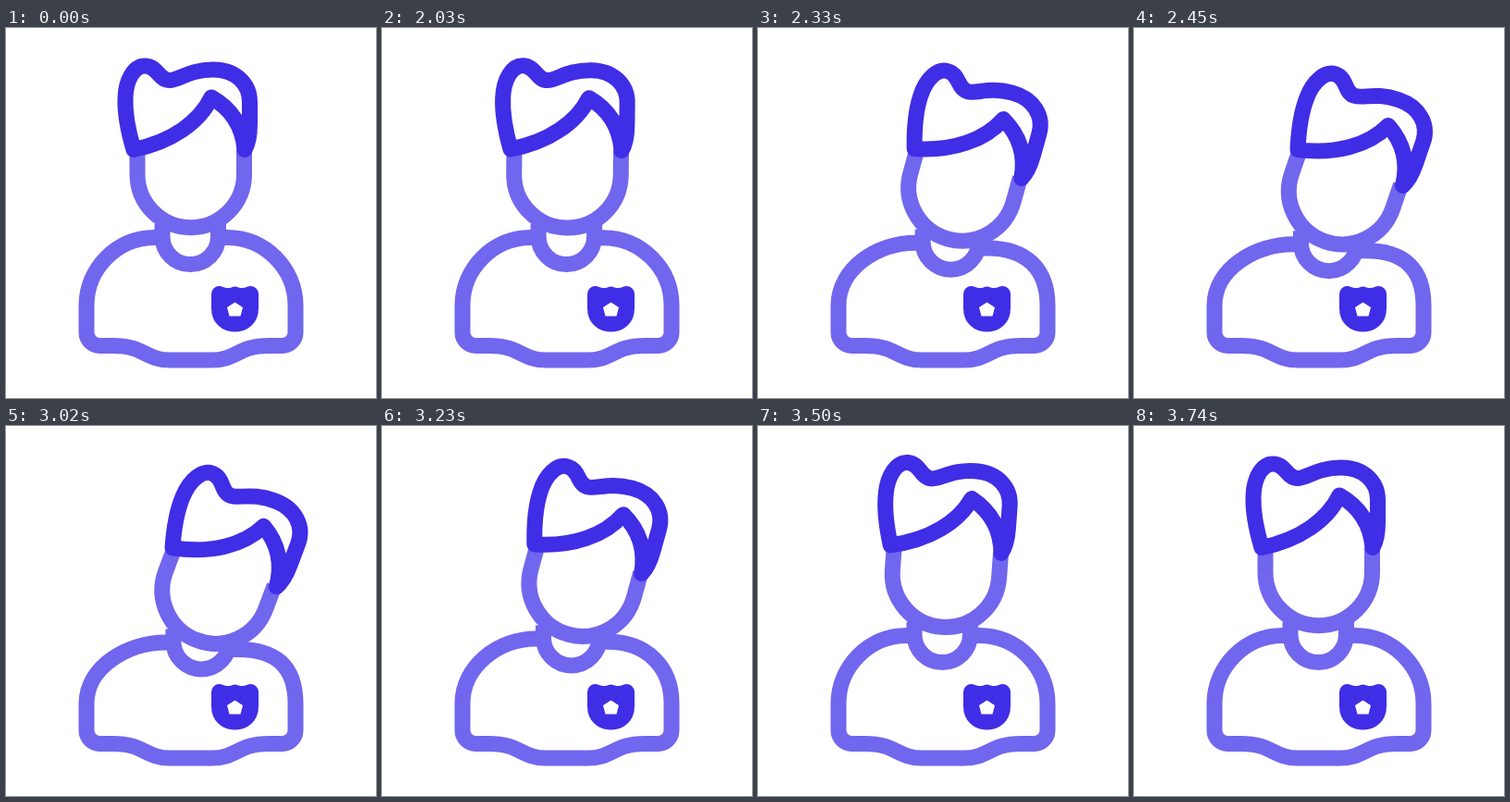
Write an HTML page with a canvas that moves like this. It is 400 px wide and 400 px high and loops after 3.77 s.

```html
<!DOCTYPE html>
<html lang="en">
<head>
<meta charset="utf-8">
<title>Tilting head</title>
<style>
  html, body { margin: 0; width: 100%; height: 100%; overflow: hidden; background: #fff; }
  canvas { display: block; width: 400px; height: 400px; }
</style>
</head>
<body>
<canvas id="stage"></canvas>
<script>
const LOOP = 3770;
const LIGHT = '#7166ee';
const DARK = '#402de6';
const TILT = 20.6 * Math.PI / 180;
const NECK = { x: 176.7, y: 204.8 };

const canvas = document.getElementById('stage');
const ctx = canvas.getContext('2d');
const dpr = window.devicePixelRatio || 1;
canvas.width = canvas.height = 400 * dpr;

const hair = new Path2D(
  'M138 131.5 C131 108 128.5 90 129 76 C129.5 55 139 41 150 41 ' +
  'C164 41 165 56.5 177 56.5 C187 56.5 198 45 224 45 C248 45 263.5 60 263.5 80 ' +
  'V104 Q263.5 122 258 131.5 C256 108 245 88 222 75 C209 102 179 123 138 131.5 Z');
const face = new Path2D('M142 131 V158 A57.75 57.75 0 0 0 257.5 158 V131');
const collar = new Path2D('M169 212 V225.25 A30.25 30.25 0 0 0 229.5 225.25 V212');
const badge = new Path2D(
  'M230.5 287.5 Q239 291.5 247.5 288 Q256 291.5 264.5 287.5 V303 ' +
  'C264.5 314 257 320 247.5 320 C238 320 230.5 314 230.5 303 Z');
const badgeHole = new Path2D('M247.5 296.5 L256 302 L253.5 311.5 H241.5 L239 302 Z');

function bezier(x1, y1, x2, y2) {
  const at = (a, b, u) => 3 * a * u * (1 - u) ** 2 + 3 * b * u * u * (1 - u) + u ** 3;
  return p => {
    if (p <= 0) return 0;
    if (p >= 1) return 1;
    let lo = 0, hi = 1;
    for (let i = 0; i < 24; i++) {
      const mid = (lo + hi) / 2;
      if (at(x1, x2, mid) < p) lo = mid; else hi = mid;
    }
    return at(y1, y2, lo);
  };
}

const tiltIn = bezier(0.3, 0.17, 0.4, 1);
const tiltOut = bezier(0.333, 0, 0.55, 1);
const slide = bezier(0.333, 0, 0.5, 1);
const span = (t, from, to) => (t - from) / (to - from);

function stroke(path, color) {
  ctx.strokeStyle = color;
  ctx.stroke(path);
}

function fill(path, color) {
  ctx.fillStyle = color;
  ctx.fill(path);
}

// The shoulders follow the collar; the right one sinks twice as far.
function bodyPath(move) {
  const dx = 12 * move;
  const left = 161 + dx, leftY = 226.5 + 7.5 * move;
  const right = 239 + dx, rightY = 226.5 + 15 * move;
  return new Path2D(
    `M${left + 8} ${leftY} H${left} C${left - 41} ${leftY} 87 260 87 300 ` +
    'V329 A14.5 14.5 0 0 0 101.5 343.5 H116 ' +
    'C150 343.5 150 359 178 359 H222 C250 359 250 343.5 284 343.5 H298.5 ' +
    `A14.5 14.5 0 0 0 313 329 V300 C313 260 ${right + 41} ${rightY} ${right} ${rightY} h-9`);
}

function draw(t) {
  const tilt = tiltIn(span(t, 2000, 2640)) - tiltOut(span(t, 3000, 3755));
  const move = slide(span(t, 2000, 2545)) - slide(span(t, 3000, 3500));

  ctx.setTransform(dpr, 0, 0, dpr, 0, 0);
  ctx.fillStyle = '#fff';
  ctx.fillRect(0, 0, 400, 400);
  ctx.lineWidth = 17;
  ctx.lineJoin = 'round';

  stroke(bodyPath(move), LIGHT);
  fill(badge, DARK);
  stroke(badge, DARK);
  fill(badgeHole, '#fff');

  ctx.save();
  ctx.translate(12 * move, 7.5 * move);
  stroke(collar, LIGHT);
  ctx.restore();

  ctx.save();
  ctx.translate(NECK.x + 12 * move, NECK.y + 8.5 * move);
  ctx.rotate(TILT * tilt);
  ctx.translate(-NECK.x, -NECK.y);
  fill(face, '#fff');
  stroke(face, LIGHT);
  ctx.translate(2 * move * tilt, 0);
  stroke(hair, DARK);
  ctx.restore();
}

const start = performance.now();
function tick() {
  draw((performance.now() - start) % LOOP);
  requestAnimationFrame(tick);
}
tick();
</script>
</body>
</html>
```
